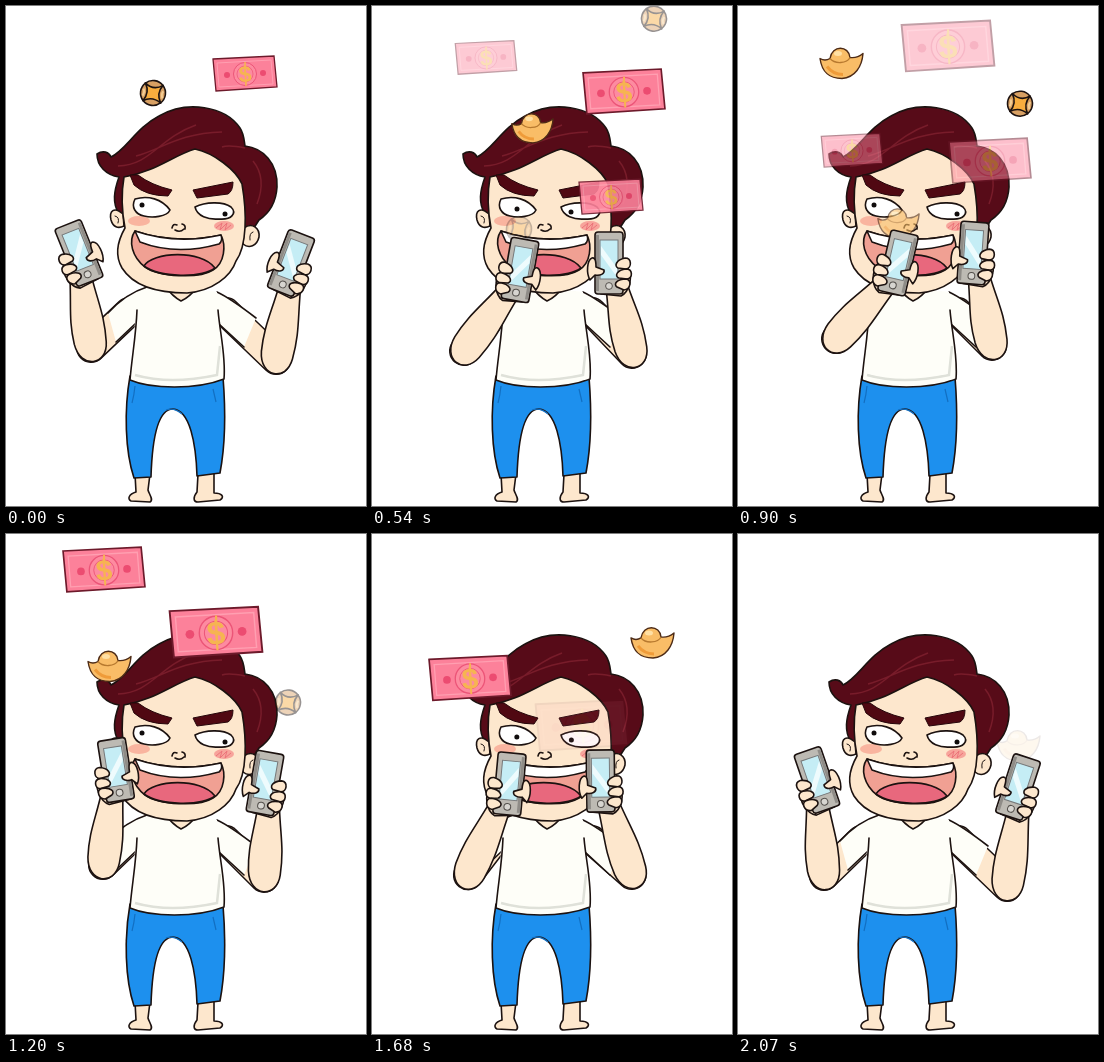
An HTML page for the animation above (2.1 s loop, 360x500 px).

```html
<!DOCTYPE html>
<html lang="en">
<head>
<meta charset="utf-8">
<title>Money rain</title>
<style>
html, body { margin: 0; width: 100%; height: 100%; overflow: hidden; background: #fff; }
svg { display: block; width: 360px; height: 500px; }
.ink { stroke: #1c1210; stroke-width: 1.6; stroke-linejoin: round; stroke-linecap: round; }
.skin { fill: #fde7cd; }
.line { fill: none; }
.hair { fill: #570b18; }
.shirt { fill: #fefef8; }
.sign { font: bold 23px "Liberation Sans", Arial, sans-serif; text-anchor: middle; fill: #f6b451; }
</style>
</head>
<body>
<svg viewBox="0 0 360 500">
  <defs>
    <g id="bill">
      <path d="M-32-15L29-18 32 13-29 17Z" fill="#fc819a" stroke="#6d1a2b" stroke-width="1.3"/>
      <path d="M-28-11L26-14 28 10-26 13Z" fill="none" stroke="#ff9fb1"/>
      <circle r="11.5" fill="#fd8ba0" stroke="#ec5578"/>
      <circle r="8" fill="none" stroke="#ec5578" stroke-width=".7"/>
      <circle cx="-18" cy="1" r="3" fill="#ec4c71"/>
      <circle cx="18" cy="-1" r="3" fill="#ec4c71"/>
      <text class="sign" y="8" transform="rotate(-4)">$</text>
      <path d="M0-12L1 12" stroke="#f6b451" stroke-width="1.5"/>
    </g>
    <g id="coin" transform="rotate(8)">
      <circle r="12.5" fill="#d8a063" class="ink"/>
      <path d="M-9-9Q0-2 9-9Q3 0 9 9Q0 3-9 9Q-3 0-9-9Z" fill="#f8ad3e" class="ink"/>
      <path d="M-10-3Q-8 0-10 4M10-3Q8 0 10 4" fill="none" stroke="#f3cd94" stroke-width="2"/>
    </g>
    <g id="ingot">
      <path d="M-21-5C-19 9-12 15 1 15C14 14 21 3 22-10Q16-5 9-6C8-18-9-19-11-5Q-16-2-21-5Z" fill="#f9bd67" stroke="#4d2b16" stroke-width="1.4" stroke-linejoin="round"/>
      <path d="M-11-5C-6 1 6 0 9-6" fill="none" stroke="#b7792f" stroke-width="1.3"/>
      <path d="M-14 3Q-8 11 2 11" fill="none" stroke="#ef9b39" stroke-width="3"/>
      <ellipse cx="-3" cy="-10" rx="4" ry="2.5" fill="#ffe0a4"/>
    </g>
    <g id="handset">
      <path class="ink skin" d="M-18 4C-25 14-20 29-12 33L8 31 14 10 0-4Z"/>
      <rect class="ink" x="-14" y="-31" width="28" height="62" rx="3" fill="#bdbab3"/>
      <path d="M11.5-28V28" stroke="#8f8c87" stroke-width="3"/>
      <rect x="-9" y="-23" width="18" height="39" fill="#c5edf5" stroke="#77797a"/>
      <path d="M-8 5L8-17V-8L-8 14Z" fill="#eefbfd"/>
      <circle cx="0" cy="23" r="3.4" fill="#d7d5d0" stroke="#54504c"/>
      <path class="ink skin" d="M-16-5C-23-5-23 5-17 6L-9 5C-5 3-7-3-16-5Z"/>
      <path class="ink skin" d="M-17 6C-24 6-24 15-18 16L-10 15C-5 13-8 7-17 6Z"/>
      <path class="ink skin" d="M-17 16C-23 17-22 26-15 27L-8 24C-4 21-8 16-17 16Z"/>
      <path class="ink skin" d="M19 17C23 10 22-3 17-5C13-6 13 1 13 4L5 7C4 11 9 13 14 12Z"/>
    </g>
  </defs>

  <g class="ink">
    <path class="skin" d="M129 468L130 486C123 488 121 493 125 495L144 496C148 494 143 488 142 484L144 468Z"/>
    <path class="skin" d="M192 468L191 486C187 491 187 496 192 496L214 494C219 491 216 487 208 487L208 467Z"/>
    <path fill="#1d90ee" d="M124 370C118 404 119 445 128 472L145 471C146 438 151 403 167 403C184 404 190 438 191 470L214 467C221 430 219 396 217 371Z"/>
  </g>
  <path d="M160 404Q168 401 176 408M129 380Q128 390 126 397M207 383L210 396" class="line" stroke="#126fc2" stroke-width="1.2"/>

  <g id="upperArms"></g>
  <g class="ink shirt">
    <path stroke="none" d="M141 281C125 286 112 296 102 307L110 336L130 318H214L238 341L250 312C235 300 224 292 211 286L190 284H160Z"/>
    <path class="line" d="M141 281C125 286 112 296 102 307M110 336L130 317M211 286C224 292 237 302 250 312M238 341L213 318"/>
    <path stroke="none" d="M141 281L129 310C129 330 126 350 124 374C145 383 190 384 218 373C220 350 214 328 212 304L211 286Z"/>
    <path class="line" d="M131 304C130 330 126 350 124 374C145 383 190 384 218 373C220 350 214 328 212 304"/>
    <path class="skin" d="M160 281Q166 290 175 295Q184 291 190 282Z"/>
  </g>
  <path d="M129 369Q164 379 211 369L214 340" class="line" stroke="#dfe1d9" stroke-width="2.5"/>

  <path class="ink hair" d="M113 208C106 197 108 185 113 171C100 169 91 160 91 148C97 144 103 146 105 151C120 144 130 122 153 110C181 94 219 100 234 122C238 128 238 134 239 140C257 142 272 157 271 181C270 198 262 208 253 214L244 228Z"/>
  <path d="M112 160C145 159 153 132 190 119M130 150C154 144 173 127 216 126M239 142C229 140 222 139 216 141M247 155Q261 172 251 198" class="line" stroke="#781c2a" stroke-width="1.5"/>
  <g class="ink skin">
    <path d="M117 208C108 200 103 205 105 214C107 221 112 223 118 220Z"/>
    <path d="M238 222C246 216 254 222 253 231C251 240 243 243 237 238Z"/>
    <path d="M118 171C115 188 116 206 119 222C111 236 109 250 116 262C128 281 153 287 181 287C207 285 225 270 230 255C241 240 241 207 236 178C230 164 208 147 189 143C168 149 149 166 118 171Z"/>
  </g>
  <path d="M109 210Q114 211 112 217M247 226Q243 227 244 234" class="ink line" style="stroke-width:1"/>
  <path d="M124 169L132 169Q145 179 166 184L162 190Q140 190 128 179ZM187 184L227 176Q227 185 222 188L191 192Z" fill="#500812" stroke="#26060a"/>
  <ellipse cx="133" cy="215" rx="11" ry="5" fill="#f9b49f"/>
  <ellipse cx="218" cy="220" rx="10" ry="5" fill="#f7a49b"/>
  <path d="M210 222l6-5-2 7 7-7-2 7 6-5" class="line" stroke="#ec747a"/>
  <g class="ink" fill="#fff">
    <path d="M129 193C142 189 156 193 164 204C161 211 146 212 138 210C129 208 125 201 129 193Z"/>
    <path d="M189 201C199 196 217 195 225 201C231 207 226 214 213 213C202 214 191 210 189 201Z"/>
  </g>
  <g fill="#100c0c"><circle id="pupilL" r="2.5"/><circle id="pupilR" r="2.5"/></g>
  <path d="M166 222Q167 217 171 219M176 218Q180 219 179 223M169 224Q174 227 178 223" class="ink line"/>
  <g class="ink">
    <path fill="#f0a093" d="M129 225C122 235 126 251 139 261C153 271 193 273 207 264C219 257 220 239 215 229Q170 239 129 225Z"/>
    <path fill="#e8687d" d="M138 260C146 246 195 243 209 262C196 272 154 272 138 260Z"/>
    <path fill="#fff" d="M129 225Q170 239 215 229Q217 235 213 238Q170 250 134 236Z"/>
  </g>

  <g id="rain"></g>
  <g id="foreArms"></g>
</svg>
<script>
const LOOP = 2100, STEP = 30, FADE_IN = 120, FADE_OUT = 240;
const $ = id => document.getElementById(id);

function add(parent, tag, attrs) {
  const node = document.createElementNS("http://www.w3.org/2000/svg", tag);
  for (const key in attrs) node.setAttribute(key, attrs[key]);
  return parent.appendChild(node);
}

// kind, x, y at start, speed (px/ms), start, end, scale
const drops = [
  ["coin", 147, 87, .252, -200, 600, 1],
  ["bill", 239, 68, .228, -200, 756, 1],
  ["bill", 252, 40, .192, 300, 1020, 1.28],
  ["ingot", 160, 67, .264, 330, 1045, .96],
  ["bill", 114, 39, .258, 490, 1020, .96],
  ["coin", 282, 0, .236, 486, 1308, 1],
  ["ingot", 103, 20, .25, 750, 1470, 1],
  ["bill", 210, 31, .194, 850, 1700, 1.45],
  ["bill", 98, 0, .226, 1040, 1980, 1.28],
  ["ingot", 280, 6, .264, 1290, 2094, 1]
].map(([kind, x, y, speed, start, end, scale]) => ({
  x, y, speed, start, end, scale,
  node: add($("rain"), "use", { href: "#" + kind })
}));
// the first two are already falling when the loop begins
drops.slice(0, 2).forEach(d => { d.y += d.speed * d.start; });

const times = [0, 540, 900, 1200, 1350, 1500, 1710, 1860, 2070, 2100];
const look = [0, 1, 0, 0, 0, .5, 1, .8, 0, 0];

function makeArm(side, shoulder, phoneX, phoneY, tilt, elbowX, elbowY) {
  const upper = ["#1c1210", "#fde7cd"].map((stroke, i) =>
    add($("upperArms"), "path", { stroke, "stroke-width": 30 - 3 * i, "stroke-linecap": "round" }));
  const fore = add($("foreArms"), "path", { class: "ink skin" });
  const hand = add($("foreArms"), "use", { href: "#handset" });
  return { side, shoulder, tracks: [phoneX, phoneY, tilt, elbowX, elbowY], upper, fore, hand };
}

const arms = [
  makeArm(1, [123, 306],
    [73, 148, 160, 110, 79, 100, 139, 119, 79, 74],
    [247, 264, 257, 236, 245, 248, 250, 248, 246, 247],
    [-22, 10, 13, -9, -18, -11, 6, -1, -19, -22],
    [85, 92, 98, 97, 87, 93, 96, 94, 86, 85],
    [342, 345, 333, 331, 341, 343, 341, 340, 342, 342]),
  makeArm(-1, [220, 306],
    [285, 237, 235, 259, 278, 247, 228, 241, 280, 284],
    [257, 257, 247, 249, 252, 248, 247, 249, 253, 257],
    [21, 0, 4, 10, 17, 7, -1, 3, 18, 21],
    [270, 260, 254, 258, 267, 258, 260, 262, 269, 270],
    [354, 348, 340, 344, 351, 342, 341, 342, 353, 354])
];

// monotone cubic through the key poses
function sample(values, t) {
  let i = 0;
  while (i < times.length - 2 && t >= times[i + 1]) i++;
  const slope = k => (values[k + 1] - values[k]) / (times[k + 1] - times[k]);
  const tangent = k => {
    if (k === 0 || k === times.length - 1) return 0;
    const a = slope(k - 1), b = slope(k);
    return a * b > 0 ? 2 * a * b / (a + b) : 0;
  };
  const span = times[i + 1] - times[i], u = (t - times[i]) / span, v = 1 - u;
  return values[i] * (1 + 2 * u) * v * v + tangent(i) * span * u * v * v
    + values[i + 1] * u * u * (3 - 2 * u) - tangent(i + 1) * span * u * u * v;
}

function poseArm(arm, t) {
  const [px, py, tilt, ex, ey] = arm.tracks.map(track => sample(track, t));
  const a = tilt * Math.PI / 180, lx = -8 * arm.side, ly = 25;
  const wx = px + lx * Math.cos(a) - ly * Math.sin(a);
  const wy = py + lx * Math.sin(a) + ly * Math.cos(a);
  const length = Math.hypot(wx - ex, wy - ey);
  const angle = Math.atan2(wx - ex, ey - wy) * 180 / Math.PI;
  arm.upper.forEach(p => p.setAttribute("d", `M${arm.shoulder}L${ex} ${ey}`));
  arm.fore.setAttribute("d", `M-11 ${-length}C-14 ${-length * .6} -18 -30 -16 -6C-13 20 14 20 16 -4C18 -30 14 ${-length * .6} 11 ${-length}`);
  arm.fore.setAttribute("transform", `translate(${ex} ${ey}) rotate(${angle})`);
  arm.hand.setAttribute("transform", `translate(${px} ${py}) rotate(${tilt}) scale(${arm.side} 1)`);
}

function place(node, x, y) {
  node.setAttribute("cx", x);
  node.setAttribute("cy", y);
}

function draw(t) {
  for (const d of drops) {
    const alpha = Math.min(1, (t - d.start) / FADE_IN, (d.end - t) / FADE_OUT);
    d.node.setAttribute("opacity", Math.max(0, alpha));
    d.node.setAttribute("transform",
      `translate(${d.x} ${d.y + d.speed * (t - d.start)}) scale(${d.scale})`);
  }
  arms.forEach(arm => poseArm(arm, t));
  const shift = sample(look, t);
  place($("pupilL"), 136 + 9 * shift, 199 + 4 * shift);
  place($("pupilR"), 219 - 20 * shift, 208 - 2 * shift);
}

const begin = performance.now();
function tick() {
  const t = (performance.now() - begin) % LOOP;
  draw(Math.floor(t / STEP) * STEP);
  requestAnimationFrame(tick);
}
tick();
</script>
</body>
</html>
```
